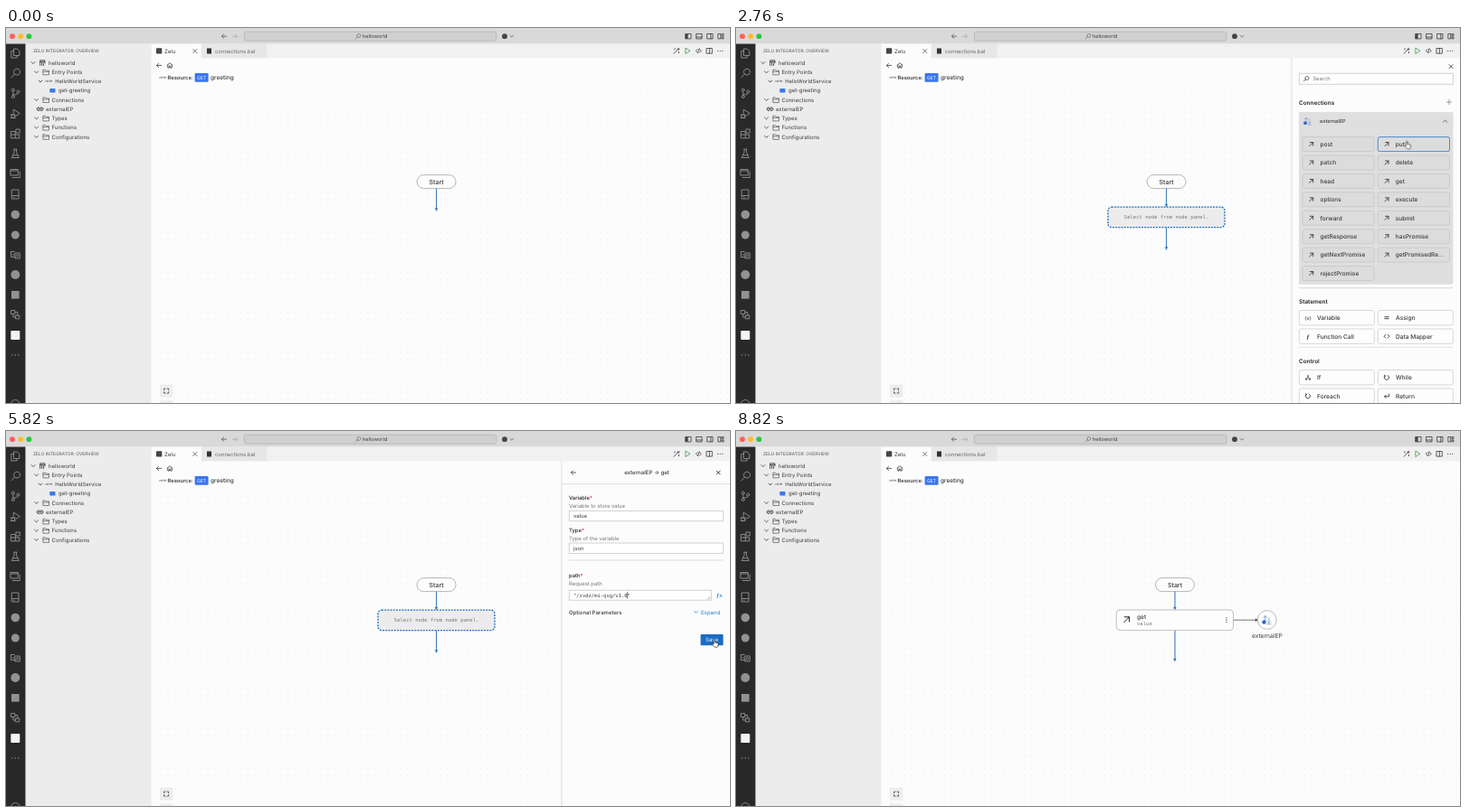
Recreate the animation shown at these times as an HTML page. Size 800 by 415 pixels, loop 9000 ms.

```html
<!DOCTYPE html>
<html lang="en">
<head>
<meta charset="utf-8">
<title>Integration designer</title>
<style>
  html, body { margin: 0; width: 100%; height: 100%; overflow: hidden; background: #fcfcfc; }
  svg { display: block; width: 100vw; height: 100vh; text-rendering: geometricPrecision; }
  text { white-space: pre; }
  .ui { font-family: Inter, "Open Sans", sans-serif; }
  .mono { font-family: "DejaVu Sans Mono", monospace; }
  .serif { font-family: "Liberation Serif", serif; font-style: italic; font-weight: 700; }
  .med { font-weight: 500; }
  .bold { font-weight: 600; }
  .mid { text-anchor: middle; }
  #panel { animation: panel 9s linear infinite; }
  #lower { animation: lower 9s step-end infinite; }
  #cursor { animation: cursor 9s ease-in-out infinite; }
  #spin { transform-origin: 425px 209px; animation: spin .9s linear infinite; }
  @keyframes panel {
    0%, 7.667% { transform: translateX(186px); opacity: 0; }
    11%, 68% { transform: none; opacity: 1; }
    71.111%, 100% { transform: translateX(186px); opacity: 0; }
  }
  @keyframes lower {
    0% { transform: none; }
    18.667% { transform: translateY(170.7px); }
    36%, 100% { transform: none; }
  }
  @keyframes spin {
    from { transform: rotate(-48deg); }
    to { transform: rotate(312deg); }
  }
</style>
</head>
<body>
<svg id="stage" viewBox="0 0 800 415" preserveAspectRatio="none"></svg>
<script>
const LOOP = 9000;
const INK = '#3a3a3a', BLUE = '#1c6dbd', GREY = '#929292';

// Drawing helpers; text is placed by its vertical middle.
const text = (x, y, s, size = 6, cls = '', fill = INK) =>
  `<text x="${x}" y="${y + size * .36}" font-size="${size}" class="${cls}" fill="${fill}">${s}</text>`;
const rect = (x, y, w, h, fill, stroke = 'none', r = 0, more = '') =>
  `<rect x="${x}" y="${y}" width="${w}" height="${h}" rx="${r}" fill="${fill}" stroke="${stroke}" stroke-width=".8" ${more}/>`;
const path = (x, y, d, stroke = INK, w = .8, fill = 'none') =>
  `<path transform="translate(${x} ${y})" d="${d}" fill="${fill}" stroke="${stroke}" stroke-width="${w}" stroke-linecap="round" stroke-linejoin="round"/>`;
const dot = (x, y, r, fill, stroke = 'none', w = .8) =>
  `<circle cx="${x}" cy="${y}" r="${r}" fill="${fill}" stroke="${stroke}" stroke-width="${w}"/>`;
const group = (id, ...parts) => `<g id="${id}">${parts.join('')}</g>`;
const line = (x1, y, x2, c = '#d4d4d4') => path(x1, y, `M0 0H${x2 - x1}`, c, .7);

const icon = {
  down: 'M-2 -1L0 1L2 -1',
  up: 'M-2 1L0 -1L2 1',
  close: 'M-2 -2L2 2M2 -2L-2 2',
  back: 'M2.6 0H-2.6M-.4 -2.2L-2.6 0L-.4 2.2',
  next: 'M-2.6 0H2.6M.4 -2.2L2.6 0L.4 2.2',
  out: 'M-2 2L2 -2M-1.4 -2H2V1.4',
  plus: 'M-2.7 0H2.7M0 -2.7V2.7',
  lens: 'M-2.6 2.8L-.6 .7A2 2 0 1 1 -.5 .8',
  folder: 'M-3.3 2.6V-2.6H-.8L.1 -1.6H3.3V2.6ZM-3.3 -.5H3.3',
  home: 'M-3 0L0 -2.8L3 0M-2.2 -.6V2.7H-.7V.7H.7V2.7H2.2V-.6',
  link: 'M-.8 -1.6H-1.8A1.6 1.6 0 0 0 -1.8 1.6H-.8M.8 -1.6H1.8A1.6 1.6 0 0 1 1.8 1.6H.8M-1.3 0H1.3',
  code: 'M-1.2 -1.8L-3 0L-1.2 1.8M1.2 -1.8L3 0L1.2 1.8',
  loop: 'M-1.9 -1.9A2.6 2.6 0 1 0 1.2 -2.3M-2.7 -2.6L-1.7 -1.8L-2.2 -.6',
  same: 'M-2.2 -1H2.2M-2.2 1H2.2',
  fork: 'M0 -2.6V-.4L-2.2 2.2M0 -.4L2.2 2.2M-2.4 1.2V2.4H-1.2M2.4 1.2V2.4H1.2',
  enter: 'M2.6 -2V.6H-2.4M-.8 -1L-2.4 .6L-.8 2.2',
  bomb: 'M1.4 .6A2.1 2.1 0 1 1 -2.8 .6A2.1 2.1 0 1 1 1.4 .6M.6 -1.2L2 -2.4M1.2 -2.8H2.6V-1.2'
};

function service(x, y, k = 1) {
  return `<g transform="translate(${x} ${y}) scale(${k})">` +
    path(0, 0, 'M-1 1V-4M-2.8 -2.4L-1 -4.3L.8 -2.4', '#7c9cc8', .9) +
    path(0, 0, 'M3 -2V3M1.4 1.6L3 3.2L4.6 1.6M.8 4.5H5', '#7c9cc8', .8) +
    dot(-2.2, 2.4, 2.1, '#2f66d0') + '</g>';
}

function titleBar() {
  const lights = ['#fe5f57', '#febc2e', '#28c840'].map((c, i) => dot(7 + i * 9.2, 9.2, 2.9, c));
  const box = 'M-3 -2.7H3V2.7H-3Z';
  return rect(0, 0, 800, 17.3, '#d9d9d9') + lights.join('') +
    path(241, 9.2, icon.back, '#555') + path(253, 9.2, icon.next, '#aaa') +
    rect(263.3, 4.2, 278.5, 10, '#d0d0d0', '#b4b4b4', 2) +
    path(389, 9.2, icon.lens, '#555', .6) + text(394, 9.2, 'helloworld', 5.6) +
    dot(551, 9.2, 2.9, '#444') + path(559, 9.2, icon.down, '#555', .7) +
    path(754, 9.2, box) + rect(751, 6.5, 2.6, 5.4, '#444') +
    path(766, 9.2, box + 'M-3 .8H3') + path(778, 9.2, box + 'M.8 -2.7V2.7') +
    path(790, 9.2, 'M-2.8 -2.7H-.3V2.7H-2.8ZM1.2 -2.7H3V-.6H1.2ZM1.2 .8H3V2.7H1.2Z');
}

function activityBar() {
  const marks = [
    [28, 'M-1.5 -5H2L4.5 -2.5V2.5H-1.5ZM-1.5 -2.5H-4.5V5H1.8V2.5'],
    [50, 'M-4.5 5L-.8 1A3.5 3.5 0 1 1 -.6 1.2'],
    [72, 'M-2.5 -2V2.5M-1 -3.5A1.5 1.5 0 1 1 -4 -3.5A1.5 1.5 0 1 1 -1 -3.5M-1 4A1.5 1.5 0 1 1 -4 4A1.5 1.5 0 1 1 -1 4M4.5 -1.5A1.5 1.5 0 1 1 1.5 -1.5A1.5 1.5 0 1 1 4.5 -1.5M3 0Q3 2 -2.5 2'],
    [95, 'M-2 -1V-5L5 -.5L.5 2.5M-.5 2.5A2 2 0 1 1 -4.5 2.5A2 2 0 1 1 -.5 2.5M-5 1H0M-5 4.5H0'],
    [117, 'M-4.5 -2.5H0V4.8H-4.5ZM-4.5 1H4.5V4.8H0M1 -5H5V-1H1Z'],
    [139, 'M-1.5 -4.8H1.5M-1.2 -4.8V-1.5L-4 4.5H4L1.2 -1.5V-4.8M-2.7 1.8H2.7'],
    [161, 'M-5 -4.5H3V2H-5ZM-5 -3H3M-3 4.5H5V-2'],
    [184, 'M-3.7 -5H3.7V5H-3.7ZM-3.7 1.5H3.7M-2 3.2H-1'],
    [251, 'M-4.8 -3.5H-1M-4.8 -3.5V2.5H0M0 -2H5V4H0ZM2.5 -.4A1.4 1.4 0 1 1 2.4 -.4M-3 0H-1'],
    [317, 'M-4.5 -4.5H-.5V-.5H-4.5ZM.5 1H4.5V4.8H.5ZM-2.5 -.5V3H.5M-.5 -2.5H2.5V1']
  ];
  return rect(0, 17.3, 21.5, 398, '#292929') +
    marks.map(([y, d]) => path(10.3, y, d, GREY, .9)).join('') +
    dot(10.3, 206.5, 4.8, GREY) + dot(10.3, 229, 4.5, GREY) + dot(10.3, 273, 5, GREY) +
    rect(6, 291, 8.6, 8.6, GREY) + rect(5.3, 335, 10, 10, '#f4f4f4', 'none', 1) +
    [6.8, 10.3, 13.8].map(x => dot(x, 362, .7, GREY)).join('') +
    path(10.3, 416.5, 'M-5 0A5 5 0 0 1 5 0', GREY, .9);
}

function sideBar() {
  const row = i => 38.6 + i * 10.22;
  const folders = [[1, 'Entry Points'], [4, 'Connections'], [6, 'Types'], [7, 'Functions'], [8, 'Configurations']];
  return rect(21.5, 17.3, 139, 398, '#ececec') + text(30, 25.4, 'ZELU INTEGRATOR: OVERVIEW', 4.9, '', '#555') +
    path(30, row(0), icon.down) + path(40.3, row(0), 'M-2.6 2.8V-2.8H2.6V.2M-2.6 -1.2H2.6M-.6 -1.2V2.8M1.3 .4V2.8', INK, .9) +
    text(47, row(0), 'helloworld') +
    folders.map(([i, s]) => path(33.6, row(i), icon.down) + path(44.2, row(i), icon.folder, '#555', .7) + text(50.5, row(i), s)).join('') +
    path(38, row(2), icon.down) + text(43.6, row(2), 'HTTP', 2.9, 'bold') + text(54.2, row(2), 'HelloWorldService', 5.9) +
    rect(48.3, row(3) - 2.3, 6.2, 4.6, '#3a78f2', 'none', .7) + text(58, row(3), 'get-greeting') +
    path(37.6, row(5), icon.link, '#222', .9) + text(44, row(5), 'externalEP');
}

function editor() {
  return rect(160.5, 17.3, 639.5, 398, '#fcfcfc') + rect(160.5, 17.3, 639.5, 16, '#f1f1f1') +
    rect(160.5, 17.3, 55, 16, '#fcfcfc') + rect(216, 17.3, 72.3, 16, '#e7e7e7') +
    rect(166, 22.2, 6.3, 6.3, '#444', 'none', .7) + text(175, 25.5, 'Zelu') + path(208.8, 25.5, icon.close, INK, .7) +
    rect(222, 22.5, 5, 6, '#333') + text(231, 25.5, 'connections.bal', 5.9, '', '#666') +
    path(741, 25.3, 'M-3 3L1 -1M2 -3V-1M1 -2H3M-2 -2.6V-1.2M2.5 1V2.4') +
    path(753.2, 25.3, 'M-2 -3L2.8 0L-2 3Z', '#3f9a4c') +
    path(765.3, 25.3, icon.code + 'M.7 -2.4L-.7 2.4') +
    path(777.3, 25.3, 'M-3 -2.8H3V2.8H-3ZM0 -2.8V2.8') +
    [786.6, 789.2, 791.8].map(x => dot(x, 25.3, .6, INK)).join('') +
    rect(168, 68.5, 632, 347, 'url(#dots)') +
    path(169, 41.4, icon.back) + path(181, 41.4, icon.home) +
    text(169.5, 55, 'HTTP', 2.9, 'bold') + text(178.5, 55, 'Resource:', 5.8, 'bold') +
    rect(208.6, 50, 15, 9.8, '#3a76ee', 'none', 1) + text(216.1, 55, 'GET', 5, 'mid', '#fff') +
    text(226, 55, 'greeting', 6.5, 'med') +
    rect(170, 394.5, 14.3, 14.3, '#ededed', 'none', 1) + rect(170, 412.3, 14.3, 6, '#ededed', 'none', 1) +
    path(177.1, 401.6, 'M-2.5 -1V-2.5H-1M1 -2.5H2.5V-1M2.5 1V2.5H1M-1 2.5H-2.5V1');
}

// Flow diagram
const start = x => rect(x - 21.5, 162.6, 43, 15, '#fcfcfc', '#a4a4a4', 7.5) + text(x, 170.1, 'Start', 7, 'mid med');
const flow = (x, y1, y2) => path(x, y1, `M0 0V${y2 - y1 - 2}`, '#2b72b8', 1) +
  path(x, y2, 'M-1.3 -3H1.3L0 -.2Z', '#2b72b8', .4, '#2b72b8');

function diagram() {
  const x = 475.6, z = 485;
  return group('empty', start(x), flow(x, 178, 202.5)) +
    group('draft', start(x), flow(x, 178, 198), flow(x, 221, 245.5),
      rect(411, 198.2, 129, 22.4, '#ececec', BLUE, 4, 'style="stroke-width:1.3;stroke-dasharray:2 1.2"'),
      group('busy', '<circle id="spin" cx="425" cy="209" r="3.1" fill="none" stroke="#1f6fc0" stroke-width="1" stroke-dasharray="5.4 20"/>',
        text(432.5, 209, 'Generating next suggestion...', 5.58, 'mono', '#777')),
      group('pick', text(475.6, 209, 'Select node from node panel.', 5.55, 'mono mid', '#777'))) +
    group('done', start(z), flow(z, 178, 198), flow(z, 221, 255),
      rect(420.3, 198, 129.2, 22.6, '#fdfdfd', '#b0b0b0', 4),
      path(431.6, 208.8, 'M-3 3L3 -3M-2.2 -3H3V2.2', '#222', 1),
      text(443, 205.5, 'get', 6.6, 'med'), text(443, 213.4, 'value', 5.6, 'mono', '#777'),
      [206.8, 209.2, 211.6].map(y => dot(542, y, .65, INK)).join(''),
      path(550, 209.2, 'M0 0H25', '#555', .8), path(577, 209.2, 'M-3 -1.3V1.3L-.2 0Z', '#444', .4, '#444'),
      dot(586.8, 209, 10.4, '#fdfdfd', '#aaa'), service(585.8, 209, 1.05),
      text(586.8, 226.2, 'externalEP', 6.7, 'mid'));
}

// Side panel
function entry(col, y, glyph, label) {
  const x = col ? 709.3 : 622.3, ix = col ? 719 : 632;
  const mark = glyph === 'fn' ? text(ix, y, 'ƒ', 7, 'serif mid')
    : glyph === 'var' ? text(ix, y, '{x}', 5.2, 'mid med') : path(ix, y, icon[glyph], INK, .9);
  return rect(x, y - 8.2, 83, 16.4, '#fdfdfd', '#cfcfcf', 2) + mark + text(col ? 729 : 642, y, label, 6.6, 'med');
}

function palette() {
  const sections = [
    ['Statement', 132, [['var', 'Variable'], ['same', 'Assign'], ['fn', 'Function Call'], ['code', 'Data Mapper']]],
    ['Control', 198, [['fork', 'If'], ['loop', 'While'], ['loop', 'Foreach'], ['enter', 'Return']]],
    ['Error Handling', 264, [['code', 'Fail'], ['bomb', 'Panic']]],
    ['Logging', 309.5, [['fn', 'Log Info'], ['fn', 'Log Error'], ['fn', 'Log Warn'], ['fn', 'Log Debug']]]
  ];
  const calls = ['post', 'put', 'patch', 'delete', 'head', 'get', 'options', 'execute', 'forward', 'submit',
    'getResponse', 'hasPromise', 'getNextPromise', 'getPromisedRe...', 'rejectPromise'];
  const callAt = i => [i % 2 ? 709.3 : 626, 128.6 + (i >> 1) * 20.42];
  const hover = i => rect(callAt(i)[0], callAt(i)[1] - 8, 79.2, 16, 'none', '#2b7fd0', 2);
  const body = sections.map(([name, y, items]) => {
    const last = y + 18 + ((items.length - 1) >> 1) * 20.5;
    return text(622, y, name, 6.4, 'bold', '#222') +
      items.map(([g, s], i) => entry(i % 2, y + 18 + (i >> 1) * 20.5, g, s)).join('') +
      line(622, last + 12, 792);
  }).join('');
  return group('palette', path(790, 42.6, icon.close, INK, .9),
    rect(622.3, 50.2, 170, 12, '#fefefe', '#c8c8c8'),
    group('focus', rect(622.3, 50.2, 170, 12, 'none', '#2f82d2'), path(636.6, 53, 'M0 0V6.5', INK, .5)),
    path(630, 56.2, icon.lens, INK, .8), text(637.4, 56.3, 'Search', 5.8, '', '#777'),
    text(622, 82.2, 'Connections', 6.4, 'bold', '#222'), path(788, 82, icon.plus, '#777', .7),
    rect(622, 93, 170.4, 20, '#dfdfdf', 'none', 2),
    group('open', rect(622, 93, 170.4, 190.8, '#dfdfdf', 'none', 2),
      calls.map((s, i) => {
        const [x, y] = callAt(i);
        return rect(x, y - 8, 79.2, 16, '#dcdcdc', '#c6c6c6', 2) +
          path(x + 9.7, y, icon.out, INK, .9) + text(x + 19.5, y, s, 6.5, 'med');
      }).join(''),
      group('overPut', hover(1)), group('overGet', hover(5)), path(783.6, 103, icon.up, INK, .8)),
    group('shut', path(783.6, 103, icon.down, INK, .8)),
    service(631, 103, .9), text(645, 103, 'externalEP', 5.6, 'med'),
    group('lower', line(622, 117, 792, '#c8c8c8'), body));
}

function form() {
  const label = (y, s, hint) => text(622, y, s + '<tspan fill="#d03030">*</tspan>', 5.9, 'med', '#222') +
    text(622, y + 9.2, hint, 5.9, '', '#777');
  const field = (y, s) => rect(622.3, y, 170, 11.4, '#fefefe', '#c8c8c8') + text(627, y + 5.8, s, 5.9);
  const key = (x, w, s, tail) => rect(x, 230, w, 8, '#fafafa', '#cfcfcf', 1) +
    text(x + w / 2, 234.2, s, 4.8, 'mid bold') + text(x + w + 2.3, 234.2, tail, 5.5, '', '#222');
  const note = ['isolated service object {isolated resource', 'function get greeting () returns', 'json|http:InternalServerError;}'];
  return group('form', path(627, 46, icon.back), text(708, 46.2, 'externalEP → get', 6.1, 'mid med'),
    path(787.2, 46, icon.close, INK, .9), line(614.5, 58.5, 800),
    label(73.4, 'Variable', 'Variable to store value'), field(88.3, 'value'),
    label(109.5, 'Type', 'Type of the variable'), field(124, 'json'), line(622, 143, 792, '#cfcfcf'),
    label(160, 'path', 'Request path'), rect(622.3, 176.2, 157, 11, '#fefefe', '#c8c8c8'),
    path(777.6, 185.6, 'M-2.4 .6L.6 -2.4M-.8 .6L.6 -.8', '#888', .5),
    text(785, 181.3, 'ƒx', 6.4, 'serif', '#1f78d6'),
    text(622, 200.6, 'Optional Parameters', 6, 'med'), path(762.4, 200.4, icon.down, '#1f78d6', .7),
    text(768, 200.6, 'Expand', 6, '', '#1f78d6'),
    rect(767.5, 225, 25, 12.2, '#1b6cc4', 'none', 1), text(780, 231.2, 'Save', 6, 'mid', '#fff'),
    group('blank', text(627, 181.8, '""', 5.5, 'mono')),
    group('typing', rect(622.3, 176.2, 157, 11, 'none', '#2f82d2')),
    group('filled', text(627, 181.8, '"/zvdz/mi-qsg/v1.0"', 5.5, 'mono'), path(686.7, 178.3, 'M0 0V6.8', '#111', .6)),
    group('hints', rect(621.5, 194.5, 163.5, 49, '#000', 'none', 1, 'opacity=".13"'),
      rect(622, 194, 162, 48, '#fdfdfd'), rect(622, 194, 162, 32.2, '#0658b8'),
      text(625.5, 199.3, '[ø]', 4.6, 'mono', '#fff'), text(636.5, 199, 'self', 5.6, 'mono bold', '#fff'),
      note.map((s, i) => text(632.4, 208.4 + i * 6.3, s, 5.6, 'mono', '#3f8fdf')).join(''),
      key(626, 7.6, '↑', ' ,'), key(639.2, 7.8, '↓', 'to navigate.'),
      key(684, 18.8, 'ENTER', 'to select.'), key(732.8, 12, 'ESC', 'to close.'),
      dot(782.2, 190.5, 3.9, '#333'), path(782.2, 190.5, 'M-1.4 -1.4L1.4 1.4M1.4 -1.4L-1.4 1.4', '#fff', .7)));
}

function cursor() {
  return group('cursor',
    group('arrow', path(0, 0, 'M0 0V7.2L1.7 5.7L2.8 8.1L3.9 7.6L2.8 5.2H5Z', '#fff', .5, '#111')),
    group('hand', path(0, 0, 'M-.9 4.5V.7A.8 .8 0 0 1 .7 .7V3L3.3 3.6Q4.2 3.9 4.1 4.9L3.6 7.4Q3.4 8.3 2.6 8.3H.9Q.3 8.3 -.1 7.7L-2.4 5.3Q-2.7 4.4 -1.9 4.2Z', '#222', .7, '#fff')),
    group('beam', path(0, 0, 'M-1.3 -3.6Q0 -3.6 0 -2.8Q0 -3.6 1.3 -3.6M0 -2.8V2.8M-1.3 3.6Q0 3.6 0 2.8Q0 3.6 1.3 3.6', '#111', .9)));
}

stage.innerHTML = '<defs><pattern id="dots" x="168" y="68.5" width="7.36" height="7.36" patternUnits="userSpaceOnUse">' +
  dot(3.68, 3.68, .5, '#dedede') + '</pattern></defs><g class="ui">' +
  editor() + diagram() +
  group('panel', rect(614, 33.5, 187, 382, '#fcfcfc'), path(614, 33.5, 'M0 0V382', '#d0d0d0', .7), palette(), form()) +
  sideBar() + activityBar() + titleBar() + cursor() + '</g>';

// Times in ms; each pair is one stretch in which the part is visible.
const spans = {
  empty: [0, 690], draft: [690, 5910], done: [5910, LOOP],
  busy: [0, 2220], pick: [2220, LOOP],
  palette: [0, 3240, 5910, LOOP], form: [3240, 5910],
  focus: [0, 1680, 5910, LOOP], open: [1680, 3240], shut: [0, 1680, 3240, LOOP],
  overPut: [2610, 2970], overGet: [3060, 3240],
  blank: [0, 4680], filled: [4680, LOOP], typing: [4440, 5490], hints: [4860, 5490],
  arrow: [0, 1620, 3240, 4200, 6690, LOOP], hand: [1620, 3240, 5280, 6690], beam: [4200, 5280]
};
const route = [
  [0, 520, -12], [90, 520, -12], [540, 475, 190], [960, 475, 192], [1470, 636.5, 90], [1620, 690, 101],
  [1950, 690, 102], [2400, 735, 116], [2760, 741.5, 125.5], [2880, 741.5, 125.5], [3120, 737, 167],
  [3270, 737, 167], [3720, 640, 165], [3900, 640, 165], [4320, 632, 181], [4800, 632, 181],
  [5130, 629, 182], [5430, 782, 190], [5520, 782, 190], [5730, 783, 231], [6600, 783, 231],
  [7500, 706, 90], [7590, 585, 203], [7800, 585, 203], [8250, 581, 206], [8700, 585, 203],
  [8815, 529, -12], [LOOP, 520, -12]
];
const pct = ms => (ms / LOOP * 100).toFixed(3) + '%';
let css = `@keyframes cursor{${route.map(([t, x, y]) => `${pct(t)}{transform:translate(${x}px,${y}px)}`).join('')}}`;
for (const [id, times] of Object.entries(spans)) {
  const lead = times[0] ? '0%{opacity:0}' : '';
  const keys = times.filter(t => t < LOOP).map((t, i) => `${pct(t)}{opacity:${1 - i % 2}}`).join('');
  css += `@keyframes ${id}{${lead}${keys}}#${id}{animation:${id} 9s step-end infinite}`;
}
const sheet = document.createElement('style');
sheet.textContent = css;
document.head.append(sheet);
</script>
</body>
</html>
```
